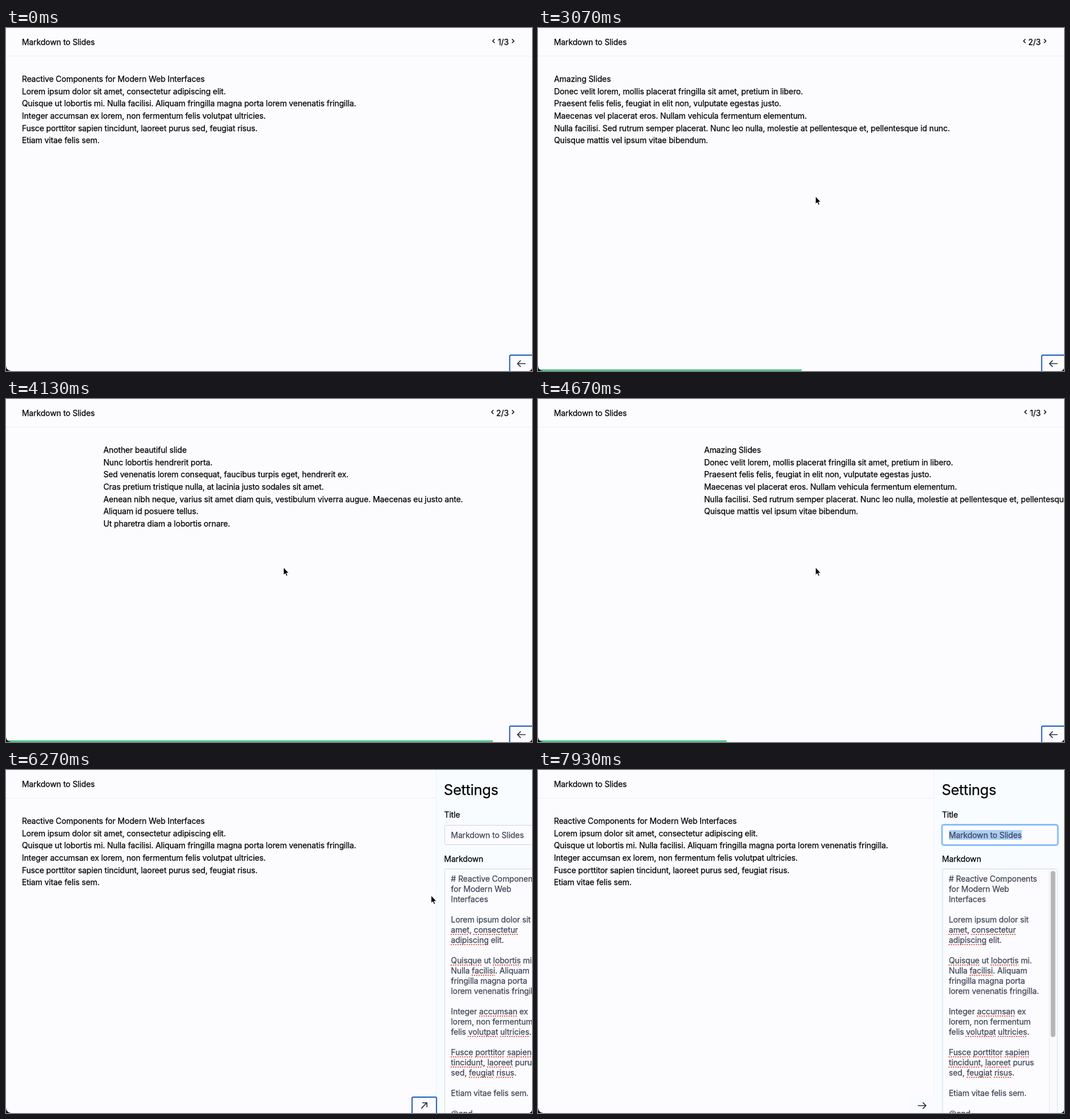
Recreate the animation shown at these times as an HTML page. Size 926 by 605 pixels, loop 8000 ms.

```html
<!DOCTYPE html>
<html lang="en">
<head>
<meta charset="utf-8">
<title>Markdown to Slides</title>
<style>
  html, body { margin: 0; width: 100%; height: 100%; overflow: hidden; background: #fcfcfe; }
  #stage {
    position: relative; width: 926px; height: 605px; overflow: hidden;
    background: #fcfcfe; color: #000;
    font: 400 14px/21.6px Inter, "Liberation Sans", sans-serif; letter-spacing: -.115px;
    -webkit-text-stroke: .25px currentColor;
    white-space: pre;
  }
  #stage * { box-sizing: border-box; }
  #stage > *, #panel > *, .slide, #nav svg { position: absolute; }
  svg { overflow: visible; fill: none; }

  header { left: 0; top: 0; width: 100%; height: 50px; padding-left: 28px; line-height: 49px; border-bottom: 1px dotted #dfe1e8; }
  #nav { right: 41px; top: 0; line-height: 49px; }
  #nav svg { top: 18.5px; stroke: #111; stroke-width: 1.6; }
  #track { left: 0; top: 79.2px; }
  .slide { top: 0; }
  #bar { left: 0; top: 602px; height: 3px; background: #58c68e; }

  #panel { left: 0; top: 0; width: 232px; height: 605px; background: #f8fcff; border-left: 1px solid #eaf1f8; }
  #panel h1 { left: 13px; top: 15px; margin: 0; font-size: 25.5px; font-weight: 400; line-height: 40px; letter-spacing: -.3px; }
  #panel label { left: 13.5px; }
  .field { left: 14px; width: 203px; border: 1px solid #ccd5e2; border-radius: 3px; background: #fcfcfe; color: #3f4557; }
  #name { top: 97px; height: 35px; padding-left: 10.5px; line-height: 33px; }
  #name.focus { box-shadow: 0 0 0 2px #8abdf8; border-color: #8abdf8; }
  #name.selected span { background: #a9cdf6; }
  #source { top: 174px; height: 460px; padding: 8px 0 0 10.5px; line-height: 18px; }
  #source u { text-decoration: underline dotted #e2554f 2px; text-underline-offset: 1.5px; text-decoration-skip-ink: none; }
  #gutter { left: 202px; top: 175px; width: 14px; height: 440px; border-left: 1px solid #e5e7ec; background: #fafafc; }
  #thumb { left: 205px; top: 178px; width: 8px; height: 293px; border-radius: 4px; background: #b4b5b5; }
  #toggle { left: -44px; top: 576px; width: 45px; height: 34px; border: 2px solid transparent; border-radius: 3px; background: #f9fbff; }
  #toggle.focus { border-color: #1c5abf; background: #fcfcfe; }
  #arrow { left: -22px; top: 591.5px; width: 1px; height: 1px; stroke: #2b3345; stroke-width: 1.7; }
</style>
</head>
<body>
<div id="stage">
  <header>Markdown to Slides</header>
  <div id="nav"><svg style="right:calc(100% + 4.5px)" width="5" height="8"><path d="M4.2 .5 .9 4l3.3 3.5"/></svg><span id="page">1/3</span><svg style="left:calc(100% + 5px)" width="5" height="8"><path d="M.8 .5 4.1 4 .8 7.5"/></svg></div>
  <div id="track"></div>
  <div id="bar"></div>
  <div id="panel">
    <h1>Settings</h1>
    <label style="top:68.4px">Title</label>
    <div id="name" class="field"><span>Markdown to Slides</span></div>
    <label style="top:145.6px">Markdown</label>
    <div id="source" class="field"></div>
    <div id="gutter"></div>
    <div id="thumb"></div>
    <div id="toggle"></div>
    <svg id="arrow"><path id="arrowPath" d="M-7 0H7M1.6-5.6 7.2 0 1.6 5.6"/></svg>
  </div>
  <svg width="926" height="605" style="left:0;top:0">
    <path fill="#0b0b0b" d="M0 596Q.8 604 9 605H0ZM926 600Q925 603.5 921 605H926Z"/>
    <path id="cursor" fill="#000" stroke="#fff" stroke-width=".9" d="M0 0V13.6L3.1 10.7 5 15.3 7.3 14.3 5.3 9.9H9.4Z"/>
  </svg>
</div>
<script>
const LOOP = 8000, FRAME = 200 / 3, SLIDE_MS = 800, VIEW = 928.4, PANEL = 232;
const $ = id => document.getElementById(id);

const slides = [
`Reactive Components for Modern Web Interfaces
Lorem ipsum dolor sit amet, consectetur adipiscing elit.
Quisque ut lobortis mi. Nulla facilisi. Aliquam fringilla magna porta lorem venenatis fringilla.
Integer accumsan ex lorem, non fermentum felis volutpat ultricies.
Fusce porttitor sapien tincidunt, laoreet purus sed, feugiat risus.
Etiam vitae felis sem.`,
`Amazing Slides
Donec velit lorem, mollis placerat fringilla sit amet, pretium in libero.
Praesent felis felis, feugiat in elit non, vulputate egestas justo.
Maecenas vel placerat eros. Nullam vehicula fermentum elementum.
Nulla facilisi. Sed rutrum semper placerat. Nunc leo nulla, molestie at pellentesque et, pellentesque id nunc.
Quisque mattis vel ipsum vitae bibendum.`,
`Another beautiful slide
Nunc lobortis hendrerit porta.
Sed venenatis lorem consequat, faucibus turpis eget, hendrerit ex.
Cras pretium tristique nulla, at lacinia justo sodales sit amet.
Aenean nibh neque, varius sit amet diam quis, vestibulum viverra augue. Maecenas eu justo ante.
Aliquam id posuere tellus.
Ut pharetra diam a lobortis ornare.`];

// Underscores mark words flagged by the spell checker.
const source = `# Reactive Components
for Modern Web
Interfaces

Lorem ipsum dolor sit
_amet_, _consectetur_
_adipiscing_ elit.

_Quisque_ ut _lobortis_ mi.
Nulla _facilisi_. Aliquam
fringilla magna porta
lorem venenatis fringilla.

Integer _accumsan_ ex
lorem, non fermentum
felis _volutpat_ _ultricies_.

_Fusce_ _porttitor_ _sapien_
_tincidunt_, _laoreet_ purus
sed, _feugiat_ _risus_.

Etiam vitae felis sem.

@end`;

slides.forEach((text, i) => {
  const slide = document.createElement("div");
  slide.className = "slide";
  slide.style.left = 28 + i * VIEW + "px";
  slide.textContent = text;
  $("track").append(slide);
});
$("source").innerHTML = source.replace(/_(\w+?)_/g, "<u>$1</u>");

// Key presses: time and slide to go to.
const presses = [[2279, 1], [3279, 2], [4069, 1], [4473, 0]];
const openAt = 5874, focusAt = 7130, selectAt = 7670;
const cursorShown = [1930, 7060];
const cursorPath = [
  [1930, 488.5, 297], [4870, 488.5, 297], [5200, 702.5, 542], [5660, 904, 588],
  [5930, 904, 588], [6267, 748.2, 221], [6730, 822, 118], [7060, 846, 112]];

const easeOut = (t, start) => {
  const x = Math.min(1, Math.max(0, (t - start) / SLIDE_MS));
  return 1 - (1 - x) ** 2;
};

// Each press starts from wherever the previous move has got to.
function slideAt(t) {
  let pos = 0, page = 0;
  presses.forEach(([start, target], i) => {
    if (t < start) return;
    const next = presses[i + 1];
    const until = next ? Math.min(t, next[0]) : t;
    pos += (target - pos) * easeOut(until, start);
    page = target;
  });
  return { pos, page };
}

function cursorAt(t) {
  const i = cursorPath.findIndex(p => p[0] > t);
  if (i < 1) return cursorPath[i < 0 ? cursorPath.length - 1 : 0].slice(1);
  const [t0, x0, y0] = cursorPath[i - 1], [t1, x1, y1] = cursorPath[i];
  const k = (t - t0) / (t1 - t0);
  return [x0 + (x1 - x0) * k, y0 + (y1 - y0) * k];
}

function render(t) {
  const { pos, page } = slideAt(t);
  $("track").style.transform = `translateX(${-pos * VIEW}px)`;
  $("bar").style.width = pos / 2 * VIEW + "px";
  $("page").textContent = `${page + 1}/3`;

  const open = easeOut(t, openAt);
  $("panel").style.transform = `translateX(${VIEW + .3 - PANEL * open}px)`;
  $("arrowPath").setAttribute("transform", `rotate(${180 * open - 180})`);
  $("toggle").classList.toggle("focus", t < focusAt);
  $("name").classList.toggle("focus", t >= focusAt);
  $("name").classList.toggle("selected", t >= selectAt);

  const shown = t >= cursorShown[0] && t < cursorShown[1];
  $("cursor").style.display = shown ? "" : "none";
  $("cursor").setAttribute("transform", `translate(${cursorAt(t)})`);
}

const begin = performance.now();
function tick() {
  const t = (performance.now() - begin) % LOOP;
  render(Math.floor((t + 5) / FRAME) * FRAME % LOOP);
  requestAnimationFrame(tick);
}
tick();
</script>
</body>
</html>
```
